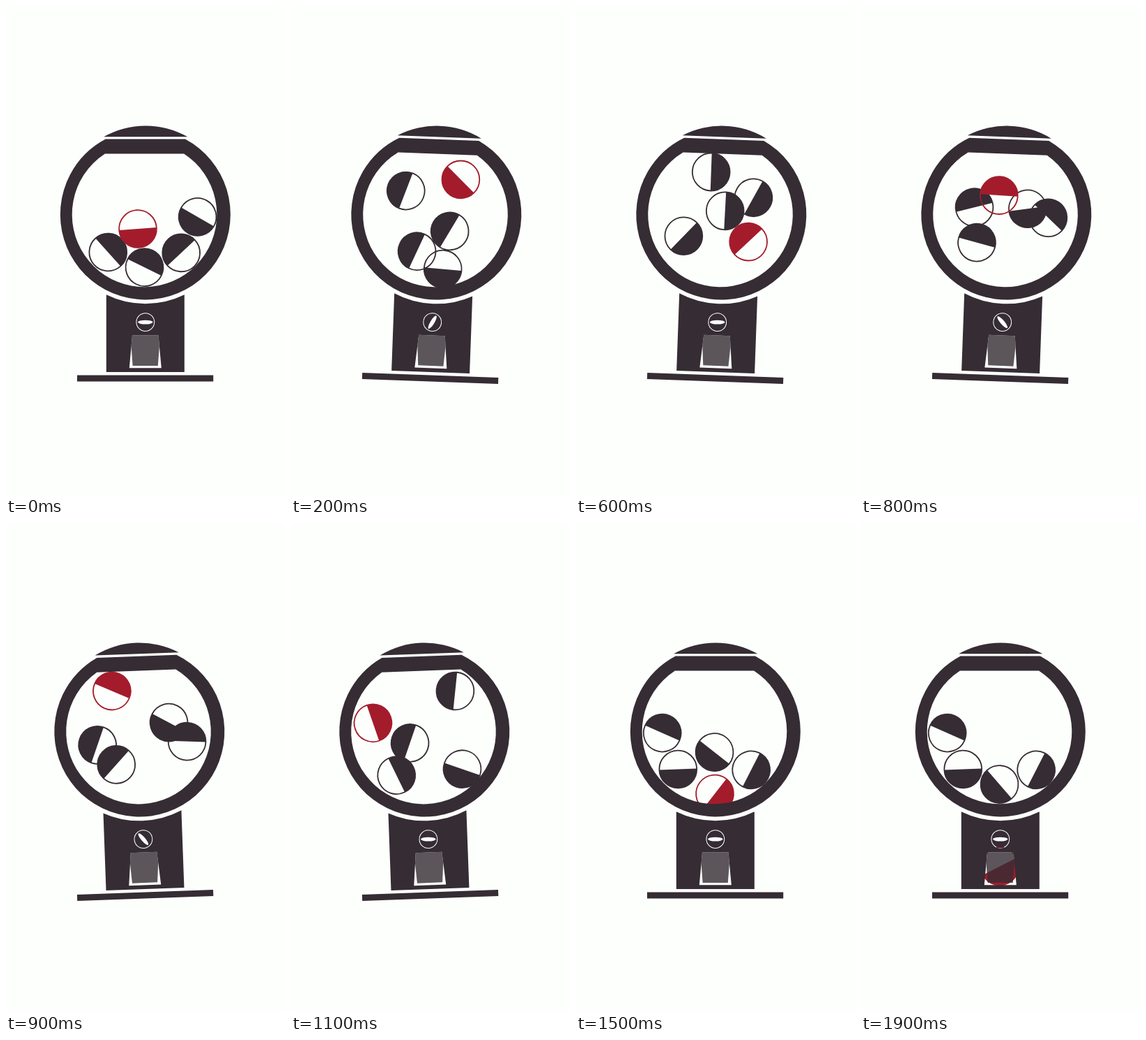
These frames come from a looping animation (400 px wide and 700 px high, 2400 ms). An HTML page with a canvas:

```html
<!DOCTYPE html>
<html lang="en">
<head>
<meta charset="utf-8">
<title>Capsule machine</title>
<style>
html, body { margin: 0; width: 100%; height: 100%; overflow: hidden; background: #fdfffc; }
canvas { display: block; width: 400px; height: 700px; }
</style>
</head>
<body>
<canvas id="stage"></canvas>
<script>
const W = 400, H = 700, LOOP = 2400, STEP = 100, LAST = 19;
const PAPER = '#fdfffc', INK = '#352c34', RED = '#a41c2c';
const RAD = Math.PI / 180;
const TILT = 2.08, PIVOT = { x: 199.5, y: 533 };
const GLOBE = { x: 199.8, y: 298.4, r: 122 };
const KNOB = { x: 199.8, y: 452.6, r: 13.4 };
const BALL_R = 26.9;
const BEATS = [0, 2, 6, 9, 11, 15];   // steps at which balls bounce
const LAND = BEATS[BEATS.length - 1];

const canvas = document.getElementById('stage');
const ctx = canvas.getContext('2d');
const dpr = window.devicePixelRatio || 1;
canvas.width = W * dpr;
canvas.height = H * dpr;

// Resting places lie side by side along the bowl, right to left.
function seat(n, turn, lift = 0) {
  const a = (2.5 + 44 * n) * RAD;
  return [199.2 + 75.5 * Math.cos(a), 298.6 + 75.5 * Math.sin(a) - lift, turn];
}

// One pose [x, y, turn] per beat; drop is the fall left after landing.
const balls = [
  { color: INK, drop: 0, poses: [seat(3, -42),
    [155, 266, -161], [183, 238, -360], [139, 315.5, -519], [178.5, 314, -519], seat(3, -632)] },
  { color: INK, drop: 0, poses: [seat(2, -64),
    [174, 352, -157], [147, 331, -318], [165, 344.5, -496], [157.5, 359.5, -384], seat(4, -426)] },
  { color: INK, drop: 0, poses: [seat(1, -133),
    [212, 376, -267], [205, 293, -359], [242.5, 287, -240], [252, 354, -249], seat(1, -333)] },
  { color: INK, drop: 46, poses: [seat(0, 120),
    [220, 321.5, 209], [245, 272.5, 387], [267.5, 315, 274], [246, 242, 188], seat(2, 128, 46)] },
  { color: RED, drop: 104, poses: [[189, 319, 86],
    [233, 247, 133], [240, 336, 225], [162.5, 239, 295], [126.5, 283.5, 343], [199, 387.5, 398]] }
];

function poseAt({ poses, drop }, step) {
  if (step >= LAND) {
    const [x, y, turn] = poses[poses.length - 1];
    const fallen = Math.min(drop, 11.7 * (step - LAND) ** 2);
    return [x, y + fallen, turn + fallen * 0.24];
  }
  const i = BEATS.findIndex(beat => beat > step) - 1;
  const p = (step - BEATS[i]) / (BEATS[i + 1] - BEATS[i]);
  return poses[i].map((v, k) => v + (poses[i + 1][k] - v) * p);
}

// Shakes from side to side, then leans back upright.
function tiltAt(step) {
  if (step === 0) return 0;
  if (step > 11) return -TILT * Math.max(0, 1 - (step - 11) / 3);
  return step % 2 ? -TILT : TILT;
}

function swing(step, from, to, size) {
  const p = Math.min(1, Math.max(0, (step - from) / (to - from)));
  return size * Math.sin(Math.PI * p);
}

function drawBall(ball, step) {
  const [x, y, turn] = poseAt(ball, step);
  ctx.save();
  ctx.translate(x, y);
  ctx.rotate(turn * RAD);
  ctx.fillStyle = ctx.strokeStyle = ball.color;
  ctx.lineWidth = 1.8;
  ctx.beginPath();
  ctx.arc(0, 0, BALL_R, -Math.PI / 2, Math.PI / 2);
  ctx.fill();
  ctx.beginPath();
  ctx.arc(0, 0, BALL_R, 0, Math.PI * 2);
  ctx.stroke();
  ctx.restore();
}

// Part of a disc above or below the chord at chordY.
function segment(cx, cy, r, chordY, above) {
  const a = Math.asin((chordY - cy) / r);
  const from = above ? Math.PI - a : a;
  const to = above ? Math.PI * 2 + a : Math.PI - a;
  ctx.moveTo(cx + r * Math.cos(from), cy + r * Math.sin(from));
  ctx.arc(cx, cy, r, from, to);
  ctx.closePath();
}

function oval(cx, cy, rx, ry, turn) {
  ctx.moveTo(cx + rx * Math.cos(turn), cy + rx * Math.sin(turn));
  ctx.ellipse(cx, cy, rx, ry, turn, 0, Math.PI * 2);
  ctx.closePath();
}

function polygon(points) {
  points.forEach(([x, y], i) => i ? ctx.lineTo(x, y) : ctx.moveTo(x, y));
  ctx.closePath();
}

function drawGlobe() {
  const { x, y, r } = GLOBE;
  ctx.beginPath();
  segment(x + 0.4, y - 5, r, 187.2, true);
  segment(x, y, r, 190.6, false);
  segment(x - 1.3, y, 103.8, 211.4, false);
  ctx.fill('evenodd');
}

// The slot and the knob are holes, so the prize shows through them.
function drawStand(knobTurn) {
  const half = 56, gapR = GLOBE.r + 5.8;
  const a = Math.acos(half / gapR);
  const left = GLOBE.x - half, right = GLOBE.x + half;
  ctx.beginPath();
  ctx.moveTo(left, 524);
  ctx.arc(GLOBE.x, GLOBE.y, gapR, Math.PI - a, a, true);
  ctx.lineTo(right, 524);
  ctx.closePath();
  oval(KNOB.x, KNOB.y, KNOB.r, KNOB.r, 0);
  oval(KNOB.x, KNOB.y, KNOB.r - 1, KNOB.r - 1, 0);
  oval(KNOB.x, KNOB.y, 10.8, 2.9, knobTurn * RAD);
  polygon([[181, 471.5], [218.5, 471.5], [222.8, 518.3], [176.8, 518.3]]);
  ctx.fill('evenodd');
  ctx.fillRect(102, 528.5, 195.2, 9);

  ctx.globalAlpha = 0.8;
  ctx.beginPath();
  polygon([[181, 471.5], [218.5, 471.5], [219.9, 487], [217.8, 515], [181.6, 515], [179.6, 487]]);
  ctx.fill();
  ctx.globalAlpha = 1;
}

function draw(time) {
  const step = Math.min(LAST, Math.floor((time % LOOP) / STEP));
  const tilt = tiltAt(step);
  ctx.setTransform(dpr, 0, 0, dpr, 0, 0);
  ctx.fillStyle = PAPER;
  ctx.fillRect(0, 0, W, H);
  ctx.translate(PIVOT.x, PIVOT.y);
  ctx.rotate(tilt * RAD);
  ctx.translate(-PIVOT.x, -PIVOT.y);
  balls.forEach(ball => drawBall(ball, step));
  ctx.fillStyle = INK;
  drawGlobe();
  drawStand(swing(step, 0, 6, -68) + swing(step, 6, 11, 52) - tilt);
}

const start = performance.now();
function tick() {
  draw(performance.now() - start);
  requestAnimationFrame(tick);
}
tick();
</script>
</body>
</html>
```
